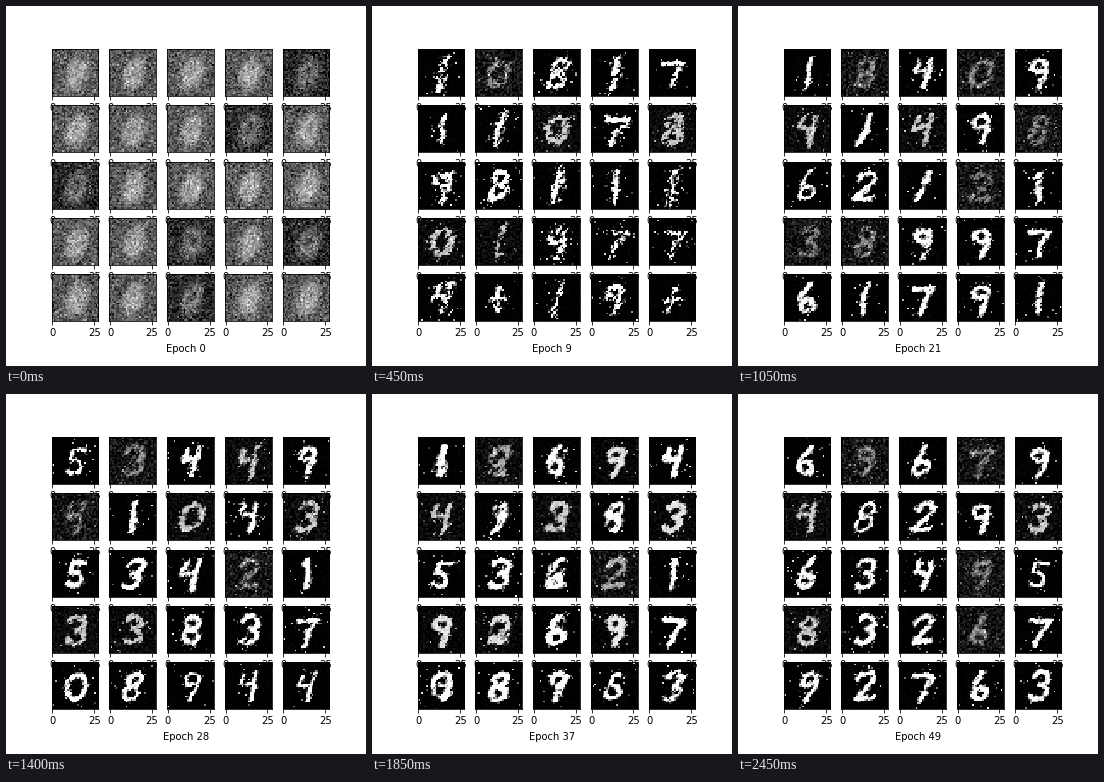
A matplotlib script that plays this animation: 360x360 px, repeating every 2500 ms.

```python
import numpy as np
import matplotlib.pyplot as plt
from matplotlib.animation import FuncAnimation

N_EPOCHS = 50
SIZE = 28
STEP_MS = 50
LEAN = 0.2
YY, XX = np.mgrid[:SIZE, :SIZE].astype(float)


def arc(cx, cy, rx, ry, start=0, end=360):
    """Oval stroke from start to end in degrees, clockwise from the right."""
    a = np.radians(np.linspace(start, end, 13))
    return list(zip(cx + rx * np.cos(a), cy + ry * np.sin(a)))


# Upright strokes on the 28 x 28 grid; they are leaned when drawn.
GLYPHS = {
    "1": [[(14, 5), (14, 23)]],
    "/": [[(16, 5), (12, 23)]],
    "|": [[(11, 8), (13, 6), (15, 23)]],
    "+": [[(13, 8), (14, 22)], [(10, 15), (18, 15)]],
    "2": [arc(14, 9.5, 4.5, 4, 190, 400) + [(9, 21), (19, 21)]],
    "3": [arc(14, 9.5, 4.5, 4, 200, 450), arc(14, 18, 4.5, 4.2, -90, 150)],
    "4": [[(10, 7), (9, 13), (17, 13)], [(17, 6), (16, 23)]],
    "5": [[(18, 7), (11, 7), (11, 13)] + arc(13, 17.5, 4.5, 4, -100, 140)],
    "6": [[(14, 5), (10, 13), (9.5, 18)], arc(13.5, 18, 4, 3.6)],
    "7": [[(8, 8), (19, 8), (15, 15), (14, 23)]],
    "8": [arc(14, 9.5, 3.8, 3.6), arc(14, 18, 4.2, 4)],
    "9": [arc(13.5, 10, 4, 3.6), [(17.5, 9), (17, 16), (15, 23)]],
    "0": [arc(14, 14, 5.5, 7.5)],
}

# Shapes per tile; "~" marks a greyer tile, "-" a thinner stroke.
STAGES = {
    9: """1  0~~ 8  1  7-
          1- 1  0~ 7  8~
          9  8  1  1  1
          0~ 1-~ 9  7- 7-
          4  +- 1- 9  +-""",
    21: """1-  8~~ 4  0~~ 9
           4~  /  4~  9  8~~
           6-  2  /   2~~ |
           3~~ 8~~ 9  9  7
           6   1  7   9  1""",
    28: """5-  3~~ 4  4~ 9
           4~~ 1  0~  4  3~
           5   3  4   2~~ |
           3~  3~ 8   3  7
           0   8  9-  4- 4-""",
    33: """1   2~ 6  9~ 4
           4-~ /  3~ 9  3~
           5-  3  6  2~~ 1-
           9~  2~ 6  9  7
           0   8  9  5- 3""",
    42: """6   4~~ 4  9  4
           4~  9  2~  6  3
           5   3  2   2~ |
           9   0  8   9~ 7
           4   8  7   6  7-""",
    49: """6  9~~ 6  7~~ 9
           4~ 8-  2  9  3~
           6  3   4  9~~ 5-
           8~ 3   2  6~~ 7
           9  2   7  6  3""",
}
KEYS = np.array(list(STAGES))
DARK_AT_START = {4, 8, 10, 17, 19, 22}


def distance(glyph, rng):
    """Distance of each cell to the nearest stroke, slightly warped."""
    px, py = rng.uniform(0, 2 * np.pi, 2)
    x = XX + LEAN * (YY - 14) + 0.6 * np.sin(YY / 3.5 + px)
    y = 14 + (YY - 14) * 1.05 + 0.6 * np.sin(XX / 3.5 + py)
    best = np.full((SIZE, SIZE), 99.0)
    for stroke in GLYPHS[glyph]:
        for (x0, y0), (x1, y1) in zip(stroke, stroke[1:]):
            dx, dy = x1 - x0, y1 - y0
            t = ((x - x0) * dx + (y - y0) * dy) / (dx * dx + dy * dy)
            t = np.clip(t, 0, 1)
            best = np.minimum(best, np.hypot(x - x0 - t * dx, y - y0 - t * dy))
    return best


def prepare(token, seed):
    """Stroke field, wide halo and greyness of one tile."""
    soft = token.count("~") / 2
    width = 1.4 if "-" in token else 2 + 0.3 * soft
    d = distance(token[0], np.random.default_rng(seed)) / width
    return np.exp(-d ** 2), np.exp(-(d / 3) ** 2), soft


TILES = [[prepare(token, 100 * k + i) for i, token in enumerate(text.split())]
         for k, text in enumerate(STAGES.values())]


def progress(epoch):
    """Index of the current stage and the eased way to the next."""
    k = np.clip(np.searchsorted(KEYS, epoch, "right") - 1, 0, len(KEYS) - 2)
    u = np.clip((epoch - KEYS[k]) / (KEYS[k + 1] - KEYS[k]), 0, 1)
    return k, u * u * (3 - 2 * u)


def clumpy(rng):
    n = rng.normal(size=(SIZE, SIZE))
    return (n + np.roll(n, 1, 0) + np.roll(n, 1, 1)) / 3 ** 0.5


def digit_image(tile, epoch, rng):
    k, u = progress(epoch)
    field, halo, soft = [(1 - u) * a + u * b
                         for a, b in zip(TILES[k][tile], TILES[k + 1][tile])]
    field = field * (1 + 0.9 * u * (1 - u))
    rough = 0.2 + 0.08 * soft + 0.2 * np.exp(-max(epoch - 9, 0) / 5)
    peak = 1 - 0.5 * soft

    ink = (3 - 1.6 * soft) * (field - 0.4 + rough * halo * clumpy(rng))
    grain = (0.015 + 0.07 * soft) * rng.normal(size=ink.shape)
    image = 0.07 * soft + grain + peak * np.clip(ink, 0, 1)
    lit = rng.random(ink.shape) < 0.02 * (0.4 + 1.6 * halo)
    return np.where(lit, image + peak * rng.uniform(0.2, 1, ink.shape), image)


def start_image(tile, rng):
    """Grey noise with a leaning blob that has a darker middle."""
    dark = tile in DARK_AT_START
    x = XX - 14.5 + LEAN * (YY - 14)
    blob = np.exp(-np.hypot(x / 6.5, (YY - 14.5) / 10) ** 4)
    hole = np.exp(-np.hypot(x / 2.5, (YY - 13) / 4) ** 2)
    base, depth = (0.16, 0.7) if dark else (0.34, 0.25)
    noise = 0.12 * rng.normal(size=x.shape)
    return base + 0.34 * (blob - depth * hole) + noise


def tile_image(tile, epoch):
    rng = np.random.default_rng(100 * epoch + tile)
    start = np.exp(-epoch / 1.5) if epoch < 9 else 0
    image = (1 - start) * digit_image(tile, epoch, rng)
    return np.clip(image + start * start_image(tile, rng), 0, 1)


plt.rcParams.update({"font.family": "DejaVu Sans", "font.size": 10})
fig, axes = plt.subplots(5, 5, figsize=(5, 5), dpi=72)
fig.subplots_adjust(left=0.125, right=0.9, bottom=0.125, top=0.88,
                    wspace=0.2, hspace=0.2)
pictures = []
for ax in axes.flat:
    pictures.append(ax.imshow(np.zeros((SIZE, SIZE)), cmap="gray",
                              vmin=0, vmax=1, interpolation="nearest"))
    ax.set(xticks=[0, 25], yticks=[])
label = fig.text(0.5, 0.04, "", ha="center")


def update(epoch):
    for tile, picture in enumerate(pictures):
        picture.set_data(tile_image(tile, epoch))
    label.set_text(f"Epoch {epoch}")
    return [*pictures, label]


anim = FuncAnimation(fig, update, frames=N_EPOCHS, interval=STEP_MS,
                     repeat=True, repeat_delay=0, blit=False)
plt.show()
```
